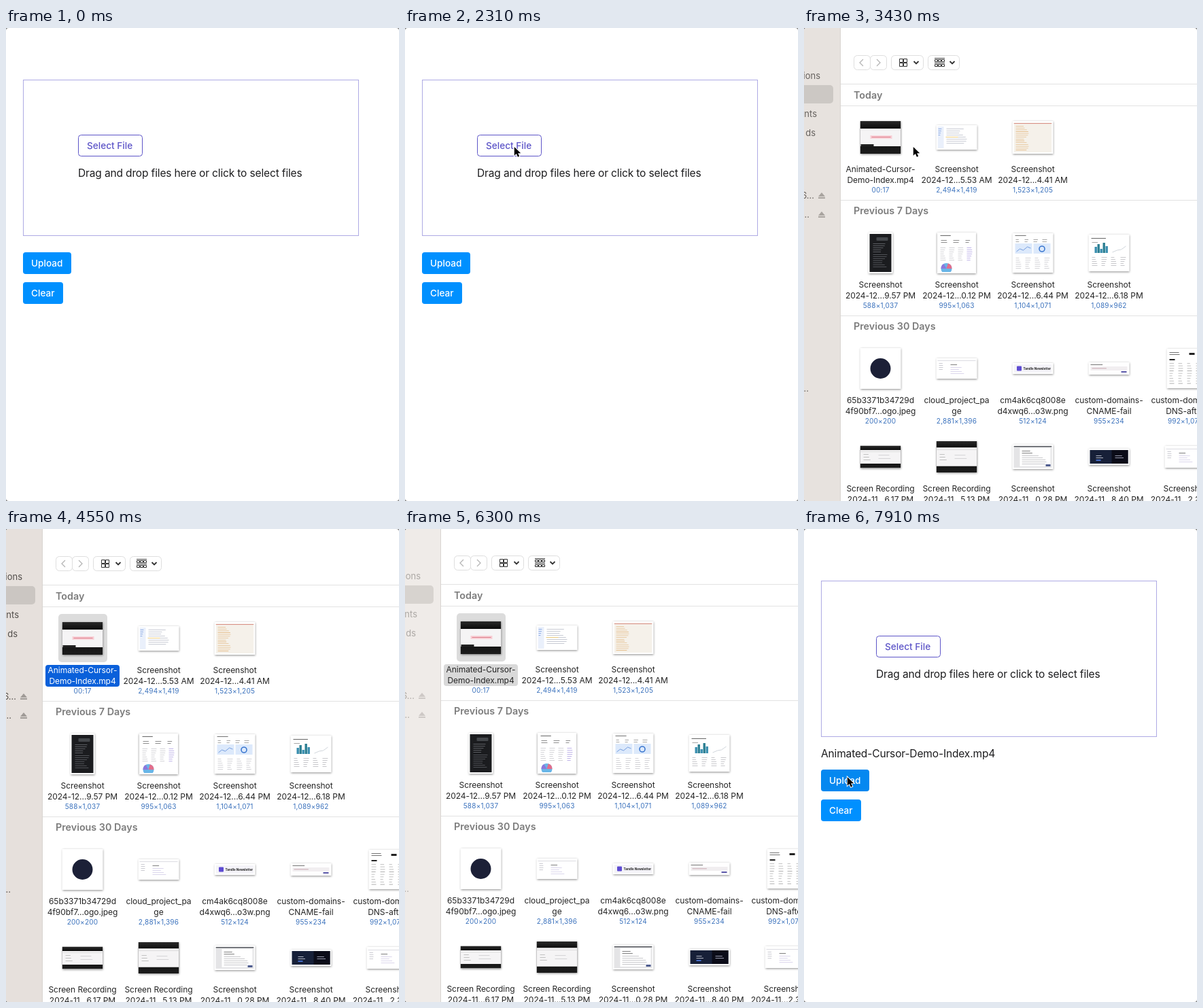
Animation, 578 px wide and 696 px high, one loop 8 s. Source, as an HTML page with a canvas:

```html
<!DOCTYPE html>
<html lang="en">
<meta charset="utf-8">
<title>File upload demo</title>
<style>
  html, body { margin: 0; width: 100%; height: 100%; overflow: hidden; }
  canvas { display: block; }
</style>
<canvas id="stage" width="578" height="696"></canvas>
<script>
const ctx = document.getElementById('stage').getContext('2d');
const LOOP = 8000, STEP = 70;
const BLUE = '#0a60da';
const clamp = v => Math.max(0, Math.min(1, v));

function rect(color, x, y, w, h, radius = 0) {
  ctx.fillStyle = color;
  ctx.beginPath();
  ctx.roundRect(x, y, w, h, radius);
  ctx.fill();
}

function frame(color, x, y, w, h, radius = 0) {
  ctx.strokeStyle = color;
  ctx.lineWidth = 1;
  ctx.beginPath();
  ctx.roundRect(x + .5, y + .5, w - 1, h - 1, radius);
  ctx.stroke();
}

function line(color, width, points) {
  ctx.strokeStyle = color;
  ctx.lineWidth = width;
  ctx.beginPath();
  points.forEach(p => ctx.lineTo(...p));
  ctx.stroke();
}

function disc(color, x, y, r, from = 0, to = 7) {
  ctx.fillStyle = color;
  ctx.beginPath();
  ctx.moveTo(x, y);
  ctx.arc(x, y, r, from, to);
  ctx.fill();
}

function text(str, x, y, size, color, { weight = 400, align = 'left', spacing = 0 } = {}) {
  ctx.font = `${weight} ${size}px Inter, sans-serif`;
  ctx.letterSpacing = spacing + 'px';
  ctx.textAlign = align;
  ctx.fillStyle = color;
  ctx.fillText(str, x, y);
}

// Miniature lines of text with irregular lengths
function lines(color, x, y, w, count, gap = 3) {
  for (let i = 0; i < count; i++)
    rect(color, x, y + i * gap, w * (.55 + .45 * Math.abs(Math.sin(i * 2.7 + x))), .8);
}

// Black picture with a light band, as in a letterboxed video
function letterbox(h, top, bottom) {
  const shade = ctx.createLinearGradient(0, -h / 2, 0, h / 2);
  shade.addColorStop(0, '#2a2a2a');
  shade.addColorStop(.25, '#080808');
  shade.addColorStop(1, '#1c1c1c');
  rect(shade, -30, -h / 2, 60, h);
  rect('#f5f4f5', -30, -h / 2 + top, 60, h - top - bottom);
}

// Thumbnails, painted around their own centre
const paint = {
  video(h) {
    letterbox(h, 11, 11);
    rect('#f8d0d6', -15, -3, 32, 5);
    rect('#dc7c8a', -13, -1, 28, 1);
    rect('#222', -29, 10, 19, 3);
  },
  code() {
    rect('#eaf0fb', -28, -16, 9, 32);
    lines('#6b93dd', -27, -13, 5, 4);
    lines('#b4b9c4', -15, -13, 30, 8);
    rect('#e9c87b', -16, -1, 18, 1);
  },
  list() {
    rect('#f5f1ea', -28, -22, 56, 44);
    rect('#d98f86', -28, -21, 56, 1);
    lines('#e6c08f', -25, -17, 19, 14, 2.7);
  },
  terminal() {
    rect('#1b1c1f', -17, -29, 34, 58);
    rect('#44474b', -6, -23, 17, 5, 1);
    lines('#707378', -11, -14, 18, 5);
    lines('#606368', -11, 2, 21, 7);
  },
  report() {
    lines('#333', -24, -26, 16, 1);
    for (let i = 0; i < 3; i++) lines('#666', -23 + i * 18, -19, 9, 2);
    for (let i = 0; i < 4; i++) lines(i < 3 ? '#c4c4ca' : '#a898e0', -24 + i * 13, -8, 8, 7);
    disc('#68b6e8', -15, 23, 8);
    disc('#e26e8c', -15, 23, 8, 5, 6.3);
    disc('#8d78dc', -15, 23, 8, 3.1, 4.2);
  },
  dashboard() {
    lines('#444', -26, -26, 18, 1);
    for (let i = 0; i < 4; i++) lines('#888', -25 + i * 13, -20, 7, 2);
    rect('#dce9fb', -26, -14, 25, 15);
    rect('#dce9fb', 1, -14, 25, 15);
    line('#5b8bd9', .8, [[-24, -2], [-19, -6], [-14, -4], [-8, -9], [-3, -7]]);
    ctx.beginPath();
    ctx.arc(13.5, -6, 4, 0, 7);
    ctx.strokeStyle = '#3c78d0';
    ctx.lineWidth = 1.6;
    ctx.stroke();
    for (let i = 0; i < 4; i++) lines('#c4c4ca', -25 + i * 14, 7, 8, 6);
  },
  chart() {
    lines('#333', -26, -22, 24, 1);
    lines('#888', -25, -16, 14, 1);
    [9, 13, 6, 15, 10].forEach((h, i) => rect(i % 2 ? '#2c7f92' : '#3a8fb0', -21 + i * 4, -h, 3.4, h));
    line('#c5cbd2', .8, [[5, -1], [12, -4], [18, -5], [25, -10]]);
    for (let i = 0; i < 4; i++) lines('#b4b4ba', -25 + i * 14, 6, 8, 5);
  },
  mark() { disc('#1c2037', 0, 0, 15); },
  page() {
    rect('#dcdce2', -30, -12, 60, 1);
    lines('#b9b9c2', -26, -8, 6, 4);
    lines('#555', -9, -6, 13, 1);
    lines('#cfc8e6', -9, -2, 22, 4);
  },
  banner() {
    rect('#f4f3f8', -28, -6, 56, 12);
    rect('#5d4bd2', -23.5, -3.5, 7, 7, 1);
    text('Tandle Newsletter', -14, 1.8, 4.6, '#222', { weight: 700 });
  },
  form() {
    lines('#444', -27, -6, 18, 1);
    rect('#f1eef0', -27, -3, 54, 6);
    lines('#b98f9c', -25, -.5, 35, 1);
    rect('#5a56a8', 18, 4, 8, 2);
  },
  table() {
    rect('#222', 6, -23, 8, 3);
    lines('#444', -23, -24, 15, 2);
    rect('#222', -23, -14, 8, 2);
    for (let i = 0; i < 4; i++) lines('#b0b0b0', -23 + i * 13, -8, 7, 9, 3.7);
  },
  recording(h) {
    letterbox(h, h * .2, h * .2);
    rect('#ddd', -30, -h * .24, 60, 1);
    lines('#b0b0b0', -25, -4, 12, 3, 4);
    lines('#cacacc', -3, -3, 26, 2, 5);
  },
  editor() {
    rect('#e4e4e6', -30, -18, 60, 36);
    rect('#fff', -19, -13, 45, 27);
    rect('#55585e', -28, -16, 56, 1.5);
    lines('#555', -16, -9, 18, 2);
    lines('#b4b4b8', -16, -2, 36, 5);
    rect('#4f5d8f', 19, 11, 7, 3);
  },
  dark() {
    rect('#172038', -30, -12, 60, 24);
    rect('#0b0c18', 4, -12, 30, 24);
    lines('#e9edf6', -19, -2, 13, 2);
    rect('#456cc8', -19, 4, 7, 2);
    lines('#c8cbe0', 9, -2, 14, 2);
  }
};

const movies = ['video', 'recording'];

const grid = [
  [161, [
    ['Animated-Cursor-', 'Demo-Index.mp4', '00:17', 60, 48, 'video'],
    ['Screenshot', '2024-12...5.53 AM', '2,494×1,419', 60, 36, 'code'],
    ['Screenshot', '2024-12...4.41 AM', '1,523×1,205', 60, 48, 'list']]],
  [331, [
    ['Screenshot', '2024-12...9.57 PM', '588×1,037', 36, 60, 'terminal'],
    ['Screenshot', '2024-12...0.12 PM', '995×1,063', 57, 60, 'report'],
    ['Screenshot', '2024-12...6.44 PM', '1,104×1,071', 60, 58, 'dashboard'],
    ['Screenshot', '2024-12...6.18 PM', '1,089×962', 60, 54, 'chart']]],
  [501, [
    ['65b3371b34729d', '4f90bf7...ogo.jpeg', '200×200', 60, 60, 'mark'],
    ['cloud_project_pa', 'ge', '2,881×1,396', 60, 30, 'page'],
    ['cm4ak6cq8008e', 'd4xwq6...o3w.png', '512×124', 60, 16, 'banner'],
    ['custom-domains-', 'CNAME-fail', '955×234', 60, 18, 'form'],
    ['custom-domains-', 'DNS-after', '992×1,077', 54, 58, 'table']]],
  [631, [
    ['Screen Recording', '2024-11...6.17 PM', '', 60, 33, 'recording'],
    ['Screen Recording', '2024-11...5.13 PM', '', 60, 46, 'recording'],
    ['Screenshot', '2024-11...0.28 PM', '', 60, 36, 'editor'],
    ['Screenshot', '2024-11...8.40 PM', '', 60, 24, 'dark'],
    ['Screenshot', '2024-11...2.38 PM', '', 60, 32, 'page']]]
];

function drawFile([name, rest, size, w, h, kind], x, y, selection) {
  if (selection) {
    rect('#dcdcdc', x - 35, y - 36, 72, 71, 5);
    rect(selection, x - 54, y + 39, 109, 32, 4);
  }
  const border = movies.includes(kind) ? 0 : 2;
  ctx.save();
  ctx.translate(x + .5, y);
  ctx.shadowColor = '#0007';
  ctx.shadowBlur = 3;
  ctx.shadowOffsetY = 1;
  rect('#fff', -w / 2, -h / 2, w, h);
  ctx.shadowColor = 'transparent';
  ctx.beginPath();
  ctx.rect(border - w / 2, border - h / 2, w - 2 * border, h - 2 * border);
  ctx.clip();
  paint[kind](h);
  ctx.restore();
  const label = { align: 'center', spacing: -.05 };
  const ink = selection === BLUE ? '#fff' : '#242424';
  text(name, x + .5, y + 51, 12, ink, label);
  text(rest, x + .5, y + 67, 12, ink, label);
  text(size, x + .5, y + 81, 10, '#3b72bd', { align: 'center', spacing: .2 });
}

function drawSidebar(strength) {
  ctx.save();
  rect('#fff', -20, -20, 73, 760);
  ctx.globalAlpha = strength;
  rect('#e6e0dc', -20, -20, 73, 760);
  rect('#cbc6c2', -20, 84, 63, 27, 5);
  ctx.globalAlpha = strength ** 2;
  [['ions', 24, 75], ['nts', 19, 131], ['ds', 17, 159], ['6...', 15, 251], ['...', 8, 279], ['...', 7, 535]]
    .forEach(([s, x, y]) => text(s, x, y, 13, '#514d4a', { align: 'right' }));
  for (const y of [247, 275]) {
    ctx.fillStyle = '#a09b97';
    ctx.beginPath();
    ctx.moveTo(26, y - 5);
    ctx.lineTo(31, y + 1);
    ctx.lineTo(21, y + 1);
    ctx.fill();
    rect('#a09b97', 21, y + 2, 10, 2);
  }
  ctx.restore();
  rect('#d9d4d1', 53, -20, 1, 760);
}

function drawToolbar() {
  for (const [x, w] of [[73, 25], [97, 25], [128, 48], [182, 47]]) frame('#dedede', x, 40, w, 22, 5);
  line('#b5b5b5', 1.3, [[87, 46], [82, 51], [87, 56]]);
  line('#b5b5b5', 1.3, [[107, 46], [112, 51], [107, 56]]);
  for (const x of [165, 218]) line('#333', 1.8, [[x - 3.5, 49], [x, 52.5], [x + 3.5, 49]]);
  for (const x of [140, 146]) for (const y of [45, 51]) frame('#333', x, y, 6, 6);
  for (const y of [45, 52]) {
    rect('#444', 192, y - 1, 15, 1);
    for (let i = 0; i < 3; i++) frame('#333', 192 + i * 5, y + 1, 5, 4);
  }
}

function drawDialog(t) {
  const opening = clamp((3500 - t) / 350), closing = Math.max(0, (t - 6230) / 70) ** 2;
  const active = t < 6160 ? clamp((t - 3150) / 350) : 0;
  const selection = t < 3780 ? null : t < 6160 ? BLUE : '#d9d9d9';
  ctx.save();
  ctx.translate(-Math.round(9 * opening ** 2 + closing), -Math.round(5 * opening ** 2 + closing));
  rect('#fff', -20, -20, 640, 760);
  drawSidebar(.65 + .35 * active);
  drawToolbar();
  for (const y of [82, 114, 253, 423]) rect('#e2e2e2', 54, y, 560, 1);
  [['Today', 104], ['Previous 7 Days', 274], ['Previous 30 Days', 444]]
    .forEach(([s, y]) => text(s, 73, y, 14.3, '#7c7c7c', { weight: 600 }));
  grid.forEach(([y, files], row) => files.forEach((file, col) =>
    drawFile(file, 112 + 112 * col, y, row + col === 0 && selection)));
  ctx.restore();
}

function button(label, y, w, color) {
  rect(color, 25, y, w, 32, 4);
  text(label, 37, y + 21, 13.6, '#fff', { weight: 500 });
}

function drawPage(t, hover) {
  const violet = '#5d55c8', ink = '#1c1c1e', body = { spacing: -.14 };
  const chosen = t >= 6580, shift = chosen ? 24 : 0;
  rect('#fff', 0, 0, 578, 696);
  ctx.setLineDash([1, 1]);
  frame(violet, 25, 76, 494, 230);
  ctx.setLineDash([]);
  frame(violet, 106, 157, 95, 32, 4);
  text('Select File', 119, 178, 13.6, violet, { weight: 500 });
  text('Drag and drop files here or click to select files', 106, 219, 15.5, ink, body);
  if (chosen) text('Animated-Cursor-Demo-Index.mp4', 25, 336, 15.5, ink, body);
  button('Upload', 330 + shift, 71, hover ? '#0588f0' : '#0090ff');
  button('Clear', 374 + shift, 59, '#0090ff');
}

// Pointer routes: [time, x, y]
const routes = [
  [[910, 270, 618], [1050, 236, 402], [1190, 236, 402], [1400, 178, 190], [1610, 178, 190], [1890, 165, 177],
   [2030, 165, 177], [2310, 160, 174], [3570, 160, 174], [3710, 140, 168], [3850, 140, 168], [3990, 298, 392], [4059, 298, 392]],
  [[7210, 234, 366], [7420, 110, 369], [7770, 64, 366], [7840, 64, 366], [7910, 63, 364], [LOOP, 63, 364]]
];

function pointerAt(t) {
  for (const route of routes) {
    const i = route.findIndex(p => p[0] > t);
    if (i < 1) continue;
    const [t0, x0, y0] = route[i - 1], [t1, x1, y1] = route[i];
    const k = (t - t0) / (t1 - t0);
    return { x: x0 + (x1 - x0) * k, y: y0 + (y1 - y0) * k };
  }
  return null;
}

function drawPointer({ x, y }) {
  ctx.save();
  ctx.translate(x + .3, y + .5);
  ctx.scale(.94, .94);
  ctx.beginPath();
  [[.5, .5], [.5, 14], [3.7, 11.2], [6, 16.3], [8.4, 15.2], [6.2, 10.3], [10.6, 10.3]].forEach(p => ctx.lineTo(...p));
  ctx.closePath();
  ctx.lineWidth = 2;
  ctx.strokeStyle = '#fff';
  ctx.stroke();
  ctx.fillStyle = '#000';
  ctx.fill();
  ctx.restore();
}

function dialogOpacity(t) {
  if (t < 3080 || t >= 6510) return 0;
  if (t < 3150) return .45;
  return t < 6370 ? 1 : t < 6440 ? .4 : .05;
}

function draw(now) {
  const t = Math.floor(now % LOOP / STEP) * STEP;
  const pointer = pointerAt(t), opacity = dialogOpacity(t);
  const hover = pointer && t > 7000 && pointer.x < 96;
  rect('#777', 0, 0, 578, 696);
  ctx.save();
  ctx.beginPath();
  ctx.roundRect(0, 0, 578, 696, 4);
  ctx.clip();
  if (opacity) drawDialog(t);
  ctx.globalAlpha = 1 - opacity;
  if (opacity < 1) drawPage(t, hover);
  ctx.globalAlpha = 1;
  if (pointer) drawPointer(pointer);
  ctx.restore();
  requestAnimationFrame(draw);
}
requestAnimationFrame(draw);
</script>
</html>
```
